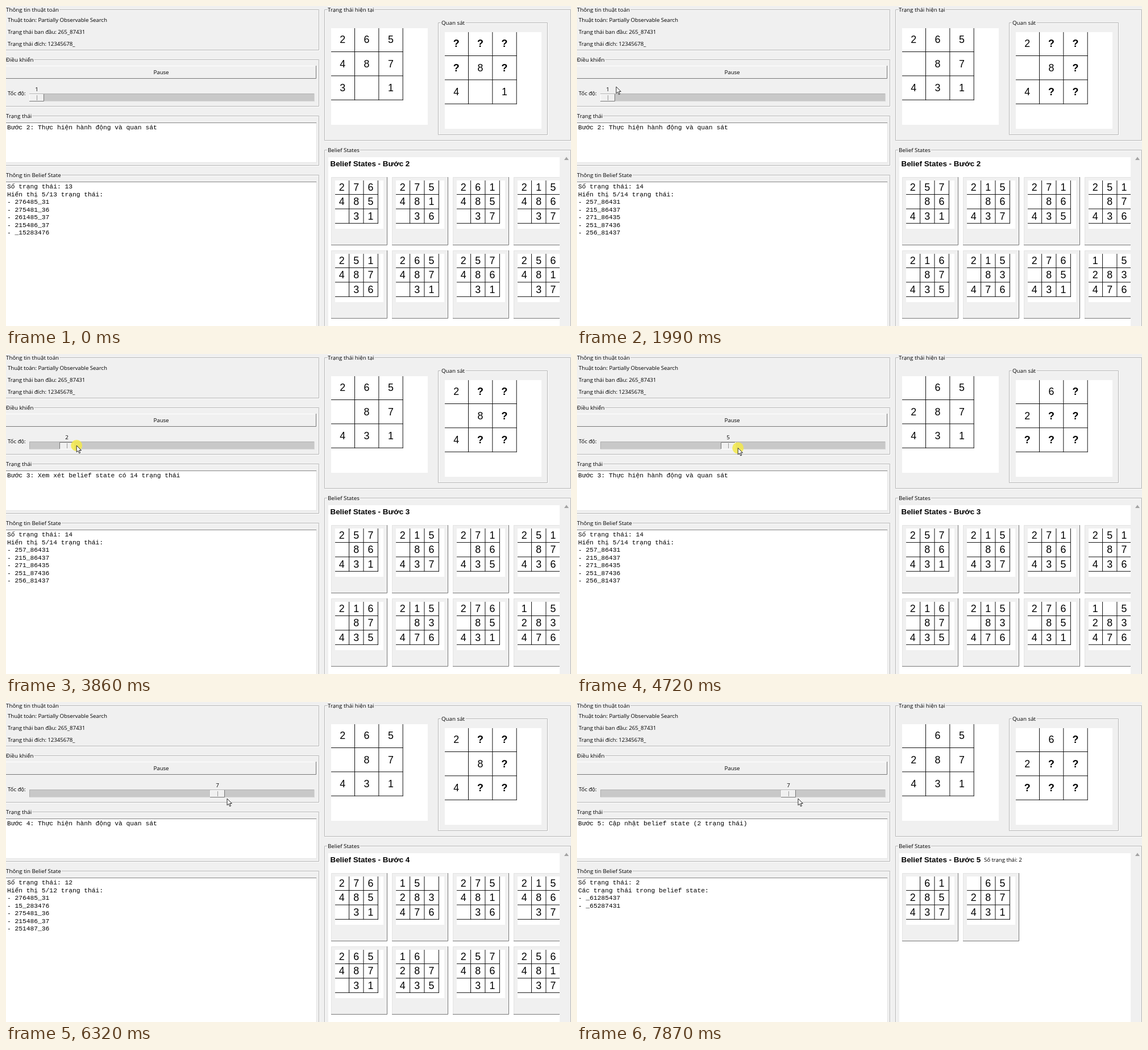
An HTML page for the animation above (8 s loop, 994x563 px).

```html
<!DOCTYPE html>
<html lang="vi">
<head>
<meta charset="utf-8">
<title>Belief States</title>
<style>
  html, body { margin: 0; width: 100%; height: 100%; overflow: hidden; background: #f0f0f0; }
  svg { display: block; width: 994px; height: 563px; }
  text { font: 9.75px "Open Sans", "Noto Sans", sans-serif; letter-spacing: -.1px; white-space: pre; }
  .cap { letter-spacing: 0; paint-order: stroke; stroke: #f0f0f0; stroke-width: 4px; }
  .mono { font: 11.28px "Courier New", "Liberation Mono", monospace; letter-spacing: 0; }
  .num { font: 17.8px Arial, "Liberation Sans", sans-serif; letter-spacing: 0; }
  .q { font-weight: bold; }
  .title { font: bold 13.4px Arial, "Liberation Sans", sans-serif; letter-spacing: 0; }
  .mid { text-anchor: middle; }
</style>
</head>
<body>
<svg viewBox="0 0 994 563">
  <defs><clipPath id="view"><rect x="567" y="265" width="407" height="298"/></clipPath></defs>
  <g id="base"></g>
  <g id="panels"></g>
  <g id="slider"></g>
  <g id="pointer">
    <circle id="halo" r="10" fill="#f3e94a" opacity=".85"/>
    <path d="M0 0V11.6L2.7 9.2 4.6 13.6 6.5 12.8 4.6 8.5H8.3Z" fill="#fff" stroke="#111" stroke-width=".9"/>
  </g>
</svg>
<script>
const LOOP = 8000;
const $ = id => document.getElementById(id);

const text = (x, y, s, cls = '') => `<text x="${x}" y="${y}" class="${cls}">${s}</text>`;
const rect = (x, y, w, h, fill) => `<rect x="${x}" y="${y}" width="${w}" height="${h}" fill="${fill}"/>`;
const line = (d, color) => `<path d="${d}" fill="none" stroke="${color}"/>`;

// Two-tone edge: top/left in one colour, bottom/right in the other
const bevel = (x, y, w, h, fill, light, dark) =>
  rect(x, y, w, h, fill) +
  line(`M${x + .5} ${y + h}V${y + .5}H${x + w}`, light) +
  line(`M${x} ${y + h - .5}H${x + w - .5}V${y}`, dark);

const group = (x, y, right, bottom, label, labelX) =>
  line(`M${x + 1.5} ${y + 1.5}H${right + 1.5}V${bottom + 1.5}H${x + 1.5}Z`, '#fff') +
  line(`M${x + .5} ${y + .5}H${right + .5}V${bottom + .5}H${x + .5}Z`, '#b4b4b4') +
  text(labelX, y + 4, label, 'cap');

function board(x, y, size, cell, cells) {
  const end = 3 * cell - .4;
  let out = rect(x, y, size, size, '#fff'), d = '';
  for (let i = 1; i < 4; i++) {
    const p = i * cell - .85;
    d += `M${x + p} ${y}v${end}M${x} ${y + p}h${end}`;
  }
  out += line(d, '#111');
  [...cells].forEach((c, i) => {
    if (c === '_') return;
    const cx = x + (i % 3 + .5) * cell - 1, cy = y + (Math.floor(i / 3) + .5) * cell - 1.2;
    out += text(cx, cy + 6.4, c, 'num mid' + (c === '?' ? ' q' : ''));
  });
  return out;
}

const card = (x, y, cells) =>
  bevel(x, y, 99, 120, '#f0f0f0', '#e3e3e3', '#777') + board(x + 7, y + 6, 85, 25.4, cells);

$('base').innerHTML =
  rect(0, 0, 994, 563, '#f0f0f0') +
  group(-2, 6, 550, 77, 'Thông tin thuật toán', 0) +
  text(3, 28, 'Thuật toán: Partially Observable Search') +
  text(3, 49, 'Trạng thái ban đầu: 265_87431') +
  text(3, 70, 'Trạng thái đích: 12345678_') +
  group(-2, 94, 550, 176, 'Điều khiển', 0) +
  bevel(-1, 105, 547, 23, '#f0f0f0', '#fff', '#777') +
  text(273, 120, 'Pause', 'mid') +
  text(3, 157, 'Tốc độ:') +
  group(-2, 193, 550, 280, 'Trạng thái', 0) +
  bevel(-1, 205, 548, 71, '#fff', '#858585', '#e3e3e3') +
  group(-2, 297, 550, 570, 'Thông tin Belief State', 0) +
  bevel(-1, 309, 548, 260, '#fff', '#858585', '#e3e3e3') +
  group(560, 6, 993, 236, 'Trạng thái hiện tại', 566) +
  group(760, 29, 952, 226, 'Quan sát', 766) +
  group(560, 253, 993, 570, 'Belief States', 566) +
  rect(567, 266, 407, 297, '#fff') +
  '<path d="M982 271L986 265.5 990 271Z" fill="#a3a3a3"/>';

const belief = (count, s) => ({ count, states: s.split(' ') });
const midLeft = '257_86431 215_86437 271_86435 251_87436 256_81437 216_87435 215_83476 276_85431 ';
const A = belief(13, '276485_31 275481_36 261485_37 215486_37 _15283476 251487_36 265487_31 257486_31 256481_37');
const B = belief(14, midLeft + '1_5283476');
const C = belief(13, '_75281436 _76285431 _51287436 _61285437 _56281437 _71286435 _15283476 _57286431 16_287435');
const D = belief(12, '276485_31 15_283476 275481_36 215486_37 251487_36 265487_31 16_287435 257486_31 256481_37');
const E = belief(12, midLeft + '275_81436');
const F = belief(1, '265_87431');
const G = belief(2, '_61285437 _65287431');

const status = {
  look: n => `Xem xét belief state có ${n} trạng thái`,
  act: () => 'Thực hiện hành động và quan sát',
  update: n => `Cập nhật belief state (${n} trạng thái)`
};
const middle = ['265_87431', '2??_8?4??'];
const down = ['265487_31', '???4??_3?'];
const up = ['_65287431', '_6?2?????'];
const start = ['2654873_1', '????8?4_1'];

// time, step, phase, [state, observation], belief
const events = [
  [0, 2, 'act', start, A],
  [660, 2, 'update', start, B],
  [1660, 2, 'act', middle, B],
  [2660, 2, 'update', middle, B],
  [3660, 3, 'look', middle, B],
  [4390, 3, 'act', up, B],
  [4780, 3, 'update', up, C],
  [5110, 3, 'act', down, C],
  [5450, 3, 'update', down, D],
  [5850, 4, 'look', down, D],
  [6190, 4, 'act', middle, D],
  [6460, 4, 'update', middle, E],
  [6730, 5, 'look', middle, E],
  [6930, 5, 'act', down, E],
  [7130, 5, 'update', down, D],
  [7330, 5, 'act', middle, D],
  [7530, 5, 'update', middle, F],
  [7670, 5, 'act', up, F],
  [7870, 5, 'update', up, G]
];

function panels([, step, phase, [state, seen], { count, states }]) {
  const few = count <= 5;
  const lines = [
    `Số trạng thái: ${count}`,
    few ? 'Các trạng thái trong belief state:' : `Hiển thị 5/${count} trạng thái:`,
    ...states.slice(0, 5).map(s => '- ' + s)
  ];
  const cards = states.map((s, i) => card(572 + i % 5 * 107, 301 + Math.floor(i / 5) * 129, s));
  return text(2, 217, `Bước ${step}: ${status[phase](count)}`, 'mono') +
    lines.map((s, i) => text(2, 321 + i * 13.5, s, 'mono')).join('') +
    board(572, 39, 170, 42.35, state) +
    board(772, 46, 170, 42.35, seen) +
    text(570.5, 281.5, `Belief States - Bước ${step}`, 'title') +
    (few ? text(716, 281, `Số trạng thái: ${count}`) : '') +
    `<g clip-path="url(#view)">${cards.join('')}</g>`;
}

function slider(value, pressed) {
  const x = 41 + (value - 1) * 53;
  return bevel(41, 154, 502, 14, '#c8c8c8', '#b0b0b0', '#d8d8d8') +
    bevel(x, 155, 26, 13, '#f0f0f0', pressed ? '#777' : '#fff', pressed ? '#fff' : '#777') +
    line(`M${x + 13.5} 157v9`, '#999') +
    text(x + 13, 150, value, 'mid');
}

// time, x, y of the pointer tip
const path = [
  [330, 966, 537], [1130, 130, 132], [1990, 69, 142], [2800, 55, 156], [3460, 55, 157],
  [3860, 124, 161], [5250, 381, 168], [5590, 389, 170], [LOOP, 389, 170]
];

function pointerAt(t) {
  const i = Math.max(1, path.findIndex(p => p[0] > t));
  const [t0, x0, y0] = path[i - 1], [t1, x1, y1] = path[i];
  const k = Math.max(0, (t - t0) / (t1 - t0));
  return [x0 + (x1 - x0) * k, y0 + (y1 - y0) * k];
}

let shown, thumb;
function frame(now) {
  const t = now % LOOP;
  const event = events.findLast(e => e[0] <= t);
  if (event !== shown) $('panels').innerHTML = panels(shown = event);

  const [x, y] = pointerAt(t);
  const pressed = t >= 3460 && t < 5390;
  const value = t < 3460 ? 1 : 1 + Math.round((x - 55) / 53);
  if (thumb !== value + '/' + pressed) {
    thumb = value + '/' + pressed;
    $('slider').innerHTML = slider(value, pressed);
  }
  $('pointer').setAttribute('transform', `translate(${x} ${y})`);
  $('pointer').style.display = t < 330 ? 'none' : '';
  $('halo').style.display = pressed ? '' : 'none';
  requestAnimationFrame(frame);
}
frame(0);
</script>
</body>
</html>
```
